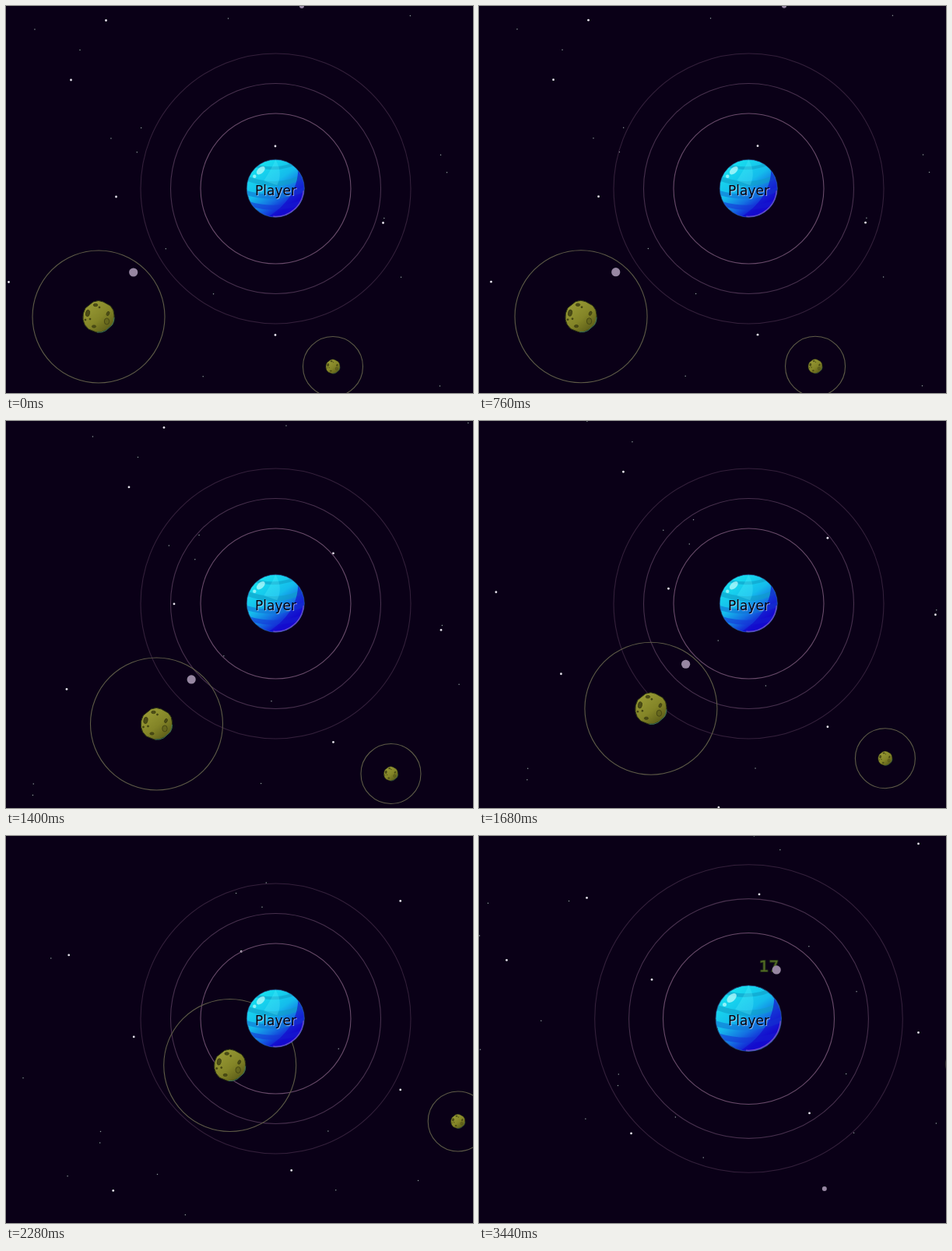
An HTML page for the animation above (3480 ms loop, 600 by 497 pixels).

```html
<!DOCTYPE html>
<html lang="en">
<head>
<meta charset="utf-8">
<title>Planet drift</title>
<style>
  html, body { margin: 0; width: 100%; height: 100%; overflow: hidden; background: #0a0017; }
  svg { display: block; width: 600px; height: 497px; }
  text { font-family: Verdana, "DejaVu Sans", sans-serif; text-anchor: middle; paint-order: stroke; stroke-linejoin: round; }
  .ring { fill: none; stroke-width: 1.1; vector-effect: non-scaling-stroke; }
  .orbit { fill: none; stroke: #5e5b47; stroke-width: 1.1; }
  .label { font-size: 17px; fill: #05020c; filter: drop-shadow(1px 1px .6px rgba(205, 215, 255, .65)); }
  .score { font-size: 20px; fill: #9bd433; stroke: #3a6216; stroke-width: 2px; }
</style>
</head>
<body>
<svg viewBox="0 0 600 497">
  <defs>
    <clipPath id="disc"><circle r="37"/></clipPath>
    <linearGradient id="sea" x1=".22" y1=".08" x2=".8" y2=".92">
      <stop offset="0" stop-color="#18e0ee"/>
      <stop offset=".4" stop-color="#14bcec"/>
      <stop offset=".65" stop-color="#1470e2"/>
      <stop offset=".88" stop-color="#1212d2"/>
    </linearGradient>
    <linearGradient id="rock-tone" x1=".2" y1=".1" x2=".85" y2=".9">
      <stop offset="0" stop-color="#979935"/>
      <stop offset=".55" stop-color="#838427"/>
      <stop offset="1" stop-color="#5b5c18"/>
    </linearGradient>
    <g id="rock">
      <path d="M-7-19Q0-22 6-19L15-14Q20-9 20-2Q21 5 18 10L10 17Q4 21-3 20L-13 16Q-19 11-20 4Q-21-4-17-11Z"
            fill="url(#rock-tone)" stroke="#2b3312"/>
      <path d="M20 1Q20 7 17 11L9 18Q4 21-2 20" fill="none" stroke="#3d7b62" stroke-width=".9"/>
      <g fill="#4c4d16" stroke="#393a10" stroke-width=".7">
        <ellipse cx="-14" cy="-4.5" rx="2.6" ry="4.2" transform="rotate(12 -14 -4.5)"/>
        <ellipse cx="-4" cy="-15" rx="2.8" ry="1.8"/>
        <ellipse cx="10.5" cy="6" rx="3.2" ry="4" fill="#66671d"/>
        <ellipse cx="12" cy="-4" rx="1.7" ry="2.8" transform="rotate(25 12 -4)"/>
        <ellipse cx="-6" cy="12.5" rx="2.6" ry="1.6"/>
        <circle cx="1" cy="-12" r="1"/>
        <circle cx="-17" cy="4" r="1"/>
        <circle cx="-11" cy="3" r="1"/>
      </g>
    </g>
  </defs>

  <rect width="600" height="497" fill="#0a0017"/>
  <g class="world" id="stars"></g>

  <g transform="translate(346.5 234.5)"><g class="grow">
    <circle class="ring" r="173.5" stroke="#34203b"/>
    <circle class="ring" r="135" stroke="#47304d"/>
    <circle class="ring" r="96.5" stroke="#694b6a"/>
  </g></g>

  <g class="world">
    <g transform="translate(420 463)">
      <circle class="orbit" r="38.5"/>
      <use href="#rock" transform="scale(.45)"/>
    </g>
    <g id="prey">
      <circle class="orbit" r="85"/>
      <use href="#rock"/>
    </g>
  </g>

  <text class="score" id="score" x="372.5" y="174" opacity="0">17</text>

  <g class="world" fill="#9787a2">
    <circle cx="163.7" cy="342" r="5.6"/>
    <circle cx="380" cy="0" r="3"/>
    <circle cx="225.3" cy="623" r="3"/>
  </g>

  <g transform="translate(346.3 234.2)">
    <g class="grow">
      <g clip-path="url(#disc)">
        <circle r="37" fill="url(#sea)"/>
        <g fill="none" stroke="#109fc8" stroke-opacity=".6" stroke-width="6">
          <path d="M-30-30Q6-19 38-38" stroke-width="4"/>
          <path d="M-40-14Q4 4 40-18"/>
          <path d="M-40 5Q2 18 40 0" stroke="#1274d6"/>
          <path d="M-40 18Q0 32 40 16" stroke="#1438d8"/>
        </g>
        <path d="M0-37Q10-20 2-4L-15-10Q-5-25 0-37Z" fill="#5ff2fa" fill-opacity=".25"/>
        <path d="M29-24Q28 13-10 37H40V-24Z" fill="#1406cc" fill-opacity=".6"/>
        <path d="M36.4 3A36.5 36.5 0 0 1-3 36.4" fill="none" stroke="#7645cb" stroke-width="2"/>
        <ellipse cx="-19" cy="-23" rx="6.5" ry="3.8" transform="rotate(-42 -19 -23)" fill="#b9fbfd" fill-opacity=".75"/>
        <circle cx="-27" cy="-15.5" r="2.2" fill="#b9fbfd" fill-opacity=".75"/>
      </g>
      <circle r="37" fill="none" stroke="#2a6cae" stroke-opacity=".6"/>
    </g>
    <text class="label" x=".2" y="8.3">Player</text>
  </g>
</svg>

<script>
const LOOP = 3480, STEP = 40, EAT = 2540, PULL = 2020;

const all = s => document.querySelectorAll(s);
const byId = id => document.getElementById(id);
const clamp = v => Math.max(0, Math.min(1, v));

function addStar(cx, cy, r, fill) {
  const star = document.createElementNS("http://www.w3.org/2000/svg", "circle");
  Object.entries({ cx, cy, r, fill }).forEach(([k, v]) => star.setAttribute(k, v));
  byId("stars").append(star);
}

// Bright stars at key points, faint ones scattered over the travelled area
const bright = [[128.5, 18.5], [83.5, 95], [346, 180], [141.5, 245], [484.5, 278.5], [3.5, 354.5],
  [346, 422.5], [-80, 249.5], [206, 526], [-23, 552], [-183, 329.5]];
bright.forEach(([x, y]) => addStar(x, y, 1.4, "#e4e0ea"));

let seed = 11;
const random = () => (seed = seed * 16807 % 2147483647) / 2147483647;
for (let i = 0; i < 30; i++) addStar(-218 + 818 * random(), 667 * random(), .75, "#8f9a9c");

// Steady speed between two times, with a soft start and a quick stop
const softRamp = (u, w) => w * Math.log1p(Math.exp(u / w));
const glide = (t, speed, start, ease, stop) => speed * (softRamp(t - start, ease) - softRamp(t - stop, 12));

const worlds = all(".world"), growers = all(".grow"), prey = byId("prey"), score = byId("score");

function draw(now) {
  const t = Math.floor((now % LOOP) / STEP) * STEP;
  const x = glide(t, .098, 640, 45, 2870), y = glide(t, -.12, 1477, 170, 2894);
  worlds.forEach(g => g.setAttribute("transform", `translate(${x} ${y})`));

  const pull = 8 * (Math.max(0, t - PULL) / 260) ** 2;
  prey.setAttribute("transform", `translate(${119 + pull} ${399 - pull})`);
  prey.setAttribute("visibility", t < EAT ? "visible" : "hidden");

  const size = 1 + .14 * clamp((t - EAT) / 160);
  growers.forEach(g => g.setAttribute("transform", `scale(${size})`));
  score.setAttribute("opacity", t < EAT ? 0 : clamp(1.2 - (t - EAT) / 1300));
  requestAnimationFrame(draw);
}
requestAnimationFrame(draw);
</script>
</body>
</html>
```
